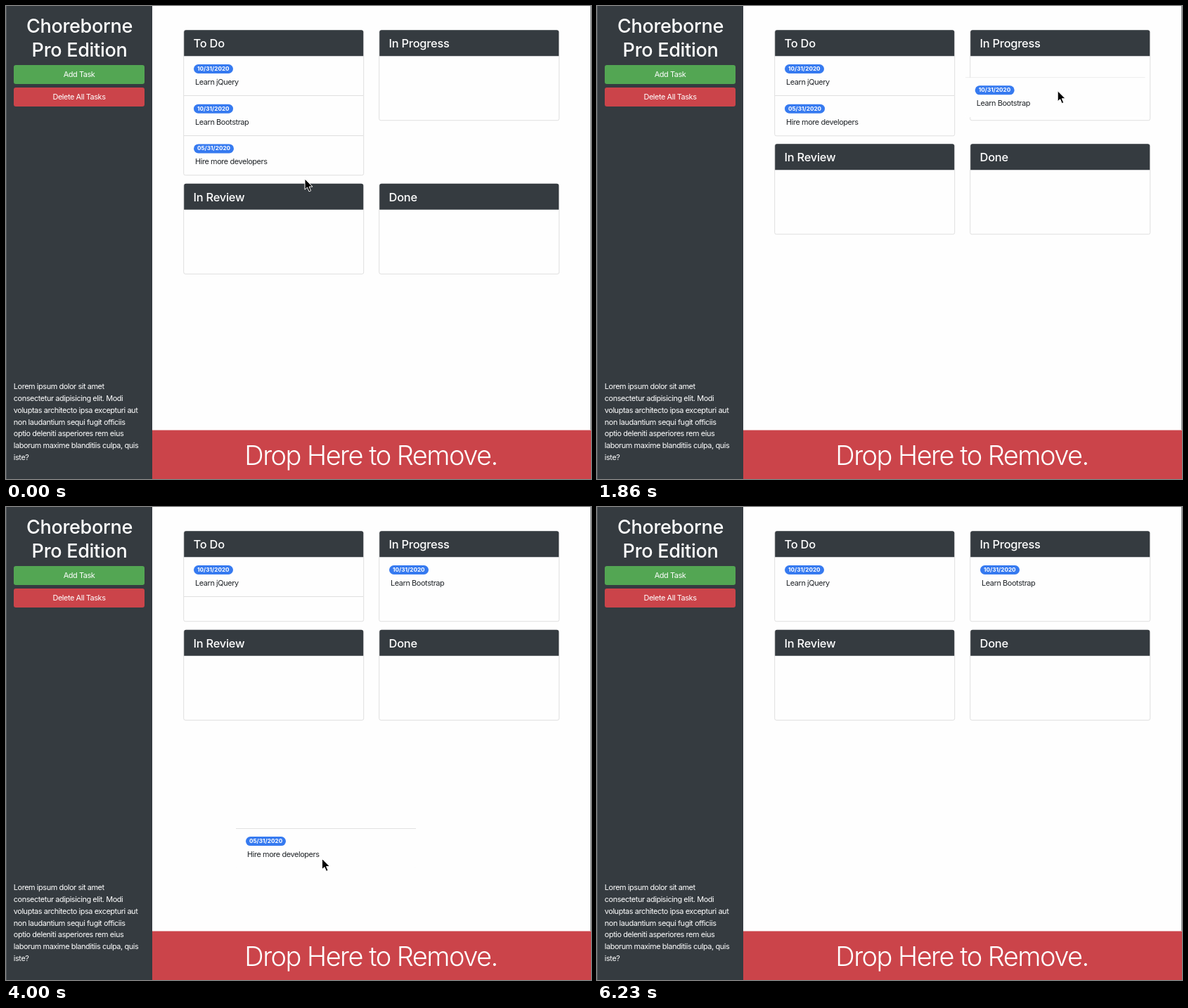
An HTML page that plays this animation: 832 px wide and 673 px high, repeating every 6260 ms.

```html
<!DOCTYPE html>
<html lang="en">
<head>
<meta charset="utf-8">
<title>Task board</title>
<style>
html, body { margin: 0; width: 100%; height: 100%; overflow: hidden; background: #fefefe; }
#stage {
  position: relative; width: 832px; height: 673px; overflow: hidden; background: #fefefe;
  font: 400 10.9px/16.8px Inter, "Open Sans", sans-serif;
  font-optical-sizing: none; letter-spacing: -.42px; color: #212529; white-space: nowrap;
}
#stage div, #stage svg { position: absolute; box-sizing: border-box; }
.side { left: 0; top: 0; width: 208px; height: 673px; background: #353b40; color: #fff; border-left: 1px solid #565b60; }
.edge { left: 831px; top: 0; width: 1px; height: 603px; background: #85888a; }
.title { left: 0; top: 12px; width: 207px; text-align: center; font-size: 27px; line-height: 33.6px; font-weight: 500; letter-spacing: -.3px; }
.btn { left: 10px; width: 186px; height: 27px; line-height: 27px; border-radius: 3px; text-align: center; }
.add { top: 84px; background: #53a653; }
.del { top: 116px; background: #cb444a; }
.lorem { left: 9.8px; top: 533.2px; }
.trash {
  left: 208px; top: 603px; width: 624px; height: 70px; padding-right: 2px; line-height: 71px;
  background: #cb444a; color: #fff; transform: translateY(.5px);
  text-align: center; font-size: 38px; font-weight: 300; letter-spacing: -1.55px;
}
.card { left: 0; top: 0; width: 257px; height: 129px; border: 1px solid #dfdfdf; border-radius: 3px; }
.head {
  left: 0; top: -1px; width: 255px; height: 37px; padding-left: 13.4px; line-height: 38px; border-radius: 3px 3px 0 0;
  background: #353b40; color: #fff; font-size: 16.4px; font-weight: 500; letter-spacing: -.24px;
}
.line { left: 253px; width: 255px; height: 1px; background: #dfdfdf; }
.item { left: 0; top: 0; width: 256px; height: 57px; border-top: 1px solid transparent; border-radius: 0 0 3px 3px; }
.item.drag { background: #fefefe; border-color: #dfdfdf; z-index: 2; }
.badge {
  left: 14px; top: 11px; height: 13px; padding: 0 5px; line-height: 13px; border-radius: 7px;
  background: #367af0; color: #fff; font-size: 8.2px; font-weight: 700; letter-spacing: 0;
}
.name { left: 16px; top: 27.6px; letter-spacing: -.4px; }
#stage svg { left: 0; top: 0; overflow: visible; z-index: 3; }
</style>
</head>
<body>
<div id="stage"></div>
<script>
const LOOP = 6260;
const DRAG_A = 1200, SHIFT_A = 1760, DROP_A = 2080;
const DRAG_B = 3200, SHIFT_B = 3680, DROP_B = 4750;
const CARD_X = 252.2, CARD_Y = 34.3, ROW_GAP = 11.5;
const HOME_X = 253, COLUMN = 278, HOME_Y = 71, ROW = 56.7;

const stage = document.getElementById('stage');

function add(cls, html = '', parent = stage) {
  const el = document.createElement('div');
  el.className = cls;
  el.innerHTML = html;
  parent.appendChild(el);
  return el;
}

function move(el, x, y) {
  el.style.transform = `translate(${x}px, ${y}px)`;
}

function show(el, on) {
  el.style.visibility = on ? 'visible' : 'hidden';
}

function addCard(label, column) {
  const el = add('card');
  move(el, CARD_X + column * COLUMN, CARD_Y);
  add('head', label, el);
  return el;
}

function addLine(y) {
  const el = add('line');
  el.style.top = y + 'px';
  return el;
}

function addItem(date, name) {
  const el = add('item');
  add('badge', date, el);
  add('name', name, el);
  return el;
}

function addCursor(shape) {
  stage.insertAdjacentHTML('beforeend', `<svg width="1" height="1">${shape}</svg>`);
  return stage.lastElementChild;
}

const side = add('side');
add('title', 'Choreborne<br>Pro Edition', side);
add('btn add', 'Add Task', side);
add('btn del', 'Delete All Tasks', side);
add('lorem', [
  'Lorem ipsum dolor sit amet',
  'consectetur adipisicing elit. Modi',
  'voluptas architecto ipsa excepturi aut',
  'non laudantium sequi fugit officiis',
  'optio deleniti asperiores rem eius',
  'laborum maxime blanditiis culpa, quis',
  'iste?'
].join('<br>'), side);
add('edge');
add('trash', 'Drop Here to Remove.');

const todo = addCard('To Do', 0);
addCard('In Progress', 1);
const review = addCard('In Review', 0);
const done = addCard('Done', 1);
const lineA = addLine(127), lineB = addLine(184);
const jquery = addItem('10/31/2020', 'Learn jQuery');
const bootstrap = addItem('10/31/2020', 'Learn Bootstrap');
const hire = addItem('05/31/2020', 'Hire more developers');

const arrow = addCursor('<path d="M0 0V15.2L3.5 12L6 17.9L8.6 16.8L6.1 11.1H11Z" stroke="#fff" stroke-linejoin="round"/>');
const bar = 'M-3 -7Q0 -7 0 -5Q0 -7 3 -7M0 -5V5M-3 7Q0 7 0 5Q0 7 3 7M-1.5 2H1.5';
const beam = addCursor(
  `<path d="${bar}" fill="none" stroke="#fff" stroke-width="2.4"/>` +
  `<path d="${bar}" fill="none" stroke="#222" stroke-width="1.1"/>`);

// Keys: time, x, y
const pointerPath = [
  [0, 425, 246], [300, 425, 246], [950, 384.5, 147], [DRAG_A, 384.5, 147],
  [1530, 524, 156], [1930, 663, 117], [DROP_A, 664, 116],
  [2530, 309.5, 177], [2950, 378, 178], [DRAG_B, 378, 178],
  [3600, 419.5, 229], [4000, 449.5, 500], [4450, 452, 633],
  [5100, 452, 633], [5300, 452, 690]
];
const hirePath = [
  [DRAG_B, 0, 0], [3600, 42, 49.8], [4000, 74, 329], [4450, 76, 462]
];

// Monotone cubic through the keys, so that holds stay still
function slope(keys, i, k) {
  if (i <= 0 || i >= keys.length - 1) return 0;
  const rate = j => (keys[j + 1][k] - keys[j][k]) / (keys[j + 1][0] - keys[j][0]);
  const a = rate(i - 1), b = rate(i);
  return a * b <= 0 ? 0 : 2 * a * b / (a + b);
}

function along(keys, t) {
  const last = keys.length - 1;
  if (t <= keys[0][0]) return keys[0].slice(1);
  if (t >= keys[last][0]) return keys[last].slice(1);
  let i = 0;
  while (t >= keys[i + 1][0]) i++;
  const span = keys[i + 1][0] - keys[i][0], u = (t - keys[i][0]) / span;
  const w = u * u * (3 - 2 * u);
  return [1, 2].map(k =>
    keys[i][k] * (1 - w) + keys[i + 1][k] * w +
    span * (u * (1 - u) ** 2 * slope(keys, i, k) - u * u * (1 - u) * slope(keys, i + 1, k)));
}

function render(t) {
  const [px, py] = along(pointerPath, t);
  const height = t < SHIFT_A ? 207 : t < SHIFT_B ? 150.5 : 129;
  const rowTop = CARD_Y + height + ROW_GAP;
  todo.style.height = height + 'px';
  move(review, CARD_X, rowTop);
  move(done, CARD_X + COLUMN, rowTop);
  show(lineA, t < DROP_B);
  show(lineB, t < SHIFT_A);

  move(jquery, HOME_X, HOME_Y);

  const dragA = t >= DRAG_A && t < DROP_A;
  bootstrap.classList.toggle('drag', dragA);
  if (dragA) move(bootstrap, HOME_X + px - 384.5, HOME_Y + ROW + py - 147);
  else if (t < DRAG_A) move(bootstrap, HOME_X, HOME_Y + ROW);
  else move(bootstrap, HOME_X + COLUMN, HOME_Y);

  const [dx, dy] = along(hirePath, t);
  hire.classList.toggle('drag', t >= DRAG_B);
  move(hire, HOME_X + dx, HOME_Y + ROW * (t < SHIFT_A ? 2 : 1) + dy);
  show(hire, t < DROP_B);

  show(arrow, t < DROP_B);
  show(beam, t >= DROP_B && t < 5300);
  move(arrow, px, py);
  move(beam, px, py);
}

const start = performance.now();
function frame() {
  render((performance.now() - start) % LOOP);
  requestAnimationFrame(frame);
}
render(0);
requestAnimationFrame(frame);
</script>
</body>
</html>
```
